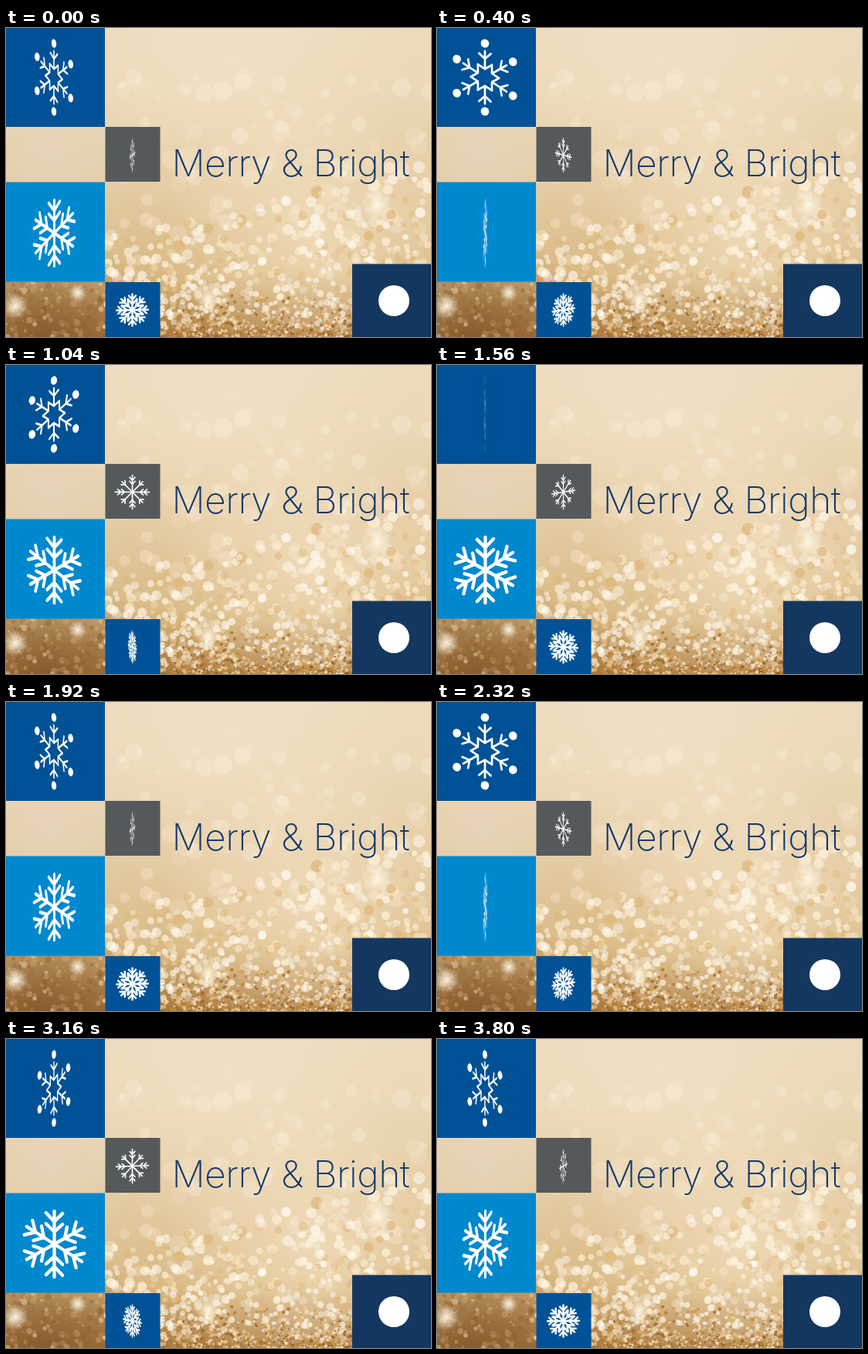
Animation of 550 by 400 pixels, one loop 3.84 s. Source, as an HTML page with a canvas:

```html
<!DOCTYPE html>
<html lang="en">
<head>
<meta charset="utf-8">
<title>Merry &amp; Bright</title>
<style>
  html, body { margin: 0; width: 550px; height: 400px; overflow: hidden; }
  canvas, svg { position: absolute; left: 0; top: 0; display: block; }
  text { font: 200 48px Inter, "Liberation Sans", sans-serif; letter-spacing: -0.5px; }
  .flake { fill: none; stroke: #fff; stroke-linecap: round; stroke-linejoin: round; }
</style>
</head>
<body>
<canvas id="glitter" width="550" height="400"></canvas>
<svg id="card" width="550" height="400" viewBox="0 0 550 400">
  <rect width="128" height="128" fill="#005195"/>
  <rect x="128.5" y="128" width="71" height="71" fill="#55595b"/>
  <rect y="199.5" width="128" height="129" fill="#0088ce"/>
  <rect x="128.5" y="329" width="71" height="71" fill="#005195"/>
  <rect x="448" y="305.5" width="102" height="95" fill="#14375f"/>
  <circle cx="502" cy="353" r="20" fill="#fff"/>
  <text x="214.5" y="192" fill="#14386a">Merry &amp; Bright</text>
</svg>
<script>
const LOOP = 3840, STEP = 40, TILT = 0.15;
const NS = "http://www.w3.org/2000/svg";
const card = document.getElementById("card");

function add(parent, tag, attrs) {
  const el = document.createElementNS(NS, tag);
  for (const name in attrs) el.setAttribute(name, attrs[name]);
  return parent.appendChild(el);
}

// Repeats one upright arm around the centre.
function addFlake({ x, y, peak, arms, arm, line, ball }) {
  const group = add(card, "g", { class: "flake", "stroke-width": line });
  for (let i = 0; i < arms; i++) {
    const spoke = add(group, "g", { transform: `rotate(${i * 360 / arms})` });
    add(spoke, "path", { d: arm(i) });
    if (ball) add(spoke, "circle", { cy: -44, r: ball, fill: "#fff", stroke: "none" });
  }
  return { group, x, y, peak };
}

const vee = (root, w, h) => `M${-w},${-root - h}L0,${-root}L${w},${-root - h}`;

const flakes = [
  { x: 62, y: 64, peak: 590, arms: 6, line: 2.8, ball: 5.6,
    arm: () => "M0,-11V-34" + vee(11, 9.5, 5.5) + vee(24, 8, 7) },
  { x: 62.5, y: 265.5, peak: 1395, arms: 6, line: 4.4,
    arm: () => "M0,0V-42.5" + vee(16, 11, 10) + vee(29, 11, 11) },
  { x: 163.5, y: 164.5, peak: 1060, arms: 8, line: 1.7,
    arm: i => i % 2 ? "M0,0V-19" + vee(13, 3.5, 4) : "M0,0V-22" + vee(10, 3.5, 4) + vee(15, 3.5, 4) },
  { x: 163.5, y: 365, peak: -85, arms: 8, line: 2.5,
    arm: () => "M0,0V-20.5" + vee(7, 5.5, 7) + vee(13.5, 4.5, 5) }
].map(addFlake);

function paintGlitter() {
  const ctx = document.getElementById("glitter").getContext("2d");
  let seed = 20;
  const rnd = (lo = 0, hi = 1) => {
    seed = (seed * 1664525 + 1013904223) % 4294967296;
    return lo + (hi - lo) * seed / 4294967296;
  };
  const dot = (x, y, r, color, alpha) => {
    ctx.globalAlpha = alpha;
    ctx.fillStyle = color;
    ctx.beginPath();
    ctx.arc(x, y, r, 0, 7);
    ctx.fill();
  };
  const glow = (x, y, r, color, alpha) => {
    const g = ctx.createRadialGradient(x, y, 0, x, y, r);
    g.addColorStop(0, color);
    g.addColorStop(1, color + "00");
    dot(x, y, r, g, alpha);
  };
  const pick = list => list[Math.floor(rnd(0, list.length))];

  const sky = ctx.createLinearGradient(0, 0, 0, 400);
  ["#ecdabb", "#ebd8b7", "#e6cfa8", "#e1c69a", "#d9b984", "#a8763a"]
    .forEach((c, i) => sky.addColorStop(i / 5, c));
  ctx.fillStyle = sky;
  ctx.fillRect(0, 0, 550, 400);
  glow(290, 40, 230, "#f4e5cb", 0.55);
  glow(60, 165, 110, "#e6d6c0", 0.7);
  glow(50, 410, 150, "#80552c", 0.85);
  glow(400, 280, 200, "#fdf0d8", 0.5);

  for (let i = 0; i < 90; i++)
    dot(rnd(128, 550), rnd(60, 270), rnd(4, 13), "#fff5e4", rnd(0.08, 0.3));

  // Specks grow denser and finer below a line rising to the right.
  const edge = x => 325 - 0.26 * x;
  for (let i = 0; i < 800; i++) {
    const x = rnd(128, 550), top = edge(x) - 40;
    const depth = Math.sqrt(rnd()), y = top + depth * (390 - top);
    const r = rnd(3, 7.5) * (1.2 - 0.65 * depth);
    dot(x, y, r, pick(["#fffdf8", "#fff8ea", "#fdf0d6", "#dfb678"]), rnd(0.25, 0.75));
  }
  for (let i = 0; i < 900; i++) {
    const x = rnd(190, 550), y = 402 - 60 * rnd() * rnd();
    dot(x, y, rnd(0.7, 2.5), pick(["#fff6e4", "#f0cd8c", "#c98c3c", "#8c5718", "#a66d28"]), rnd(0.4, 0.85));
  }
  for (let i = 0; i < 150; i++)
    dot(rnd(0, 128), rnd(329, 400), rnd(1, 4.5), pick(["#d9b078", "#f6e4c0", "#8a5c2c"]), rnd(0.12, 0.45));

  const flare = (x, y, r) => {
    glow(x, y, r, "#fff8e4", 0.9);
    ctx.strokeStyle = "#fffaf0";
    ctx.lineWidth = 0.6;
    ctx.globalAlpha = 0.4;
    ctx.beginPath();
    for (let a = 0.3; a < 3; a += Math.PI / 4) {
      const dx = r * Math.cos(a), dy = r * Math.sin(a);
      ctx.moveTo(x - dx, y - dy);
      ctx.lineTo(x + dx, y + dy);
    }
    ctx.stroke();
  };
  flare(12, 360, 17);
  flare(93, 343, 12);
  flare(262, 351, 18);
  flare(480, 229, 20);
}

// Each flake spins about its vertical axis, seen from slightly above.
function render(ms) {
  const t = Math.floor(ms % LOOP / STEP) * STEP;
  for (const { group, x, y, peak } of flakes) {
    const a = 2 * Math.PI * (t - peak) / LOOP;
    group.setAttribute("transform",
      `matrix(${Math.cos(a).toFixed(5)} ${(-TILT * Math.sin(a)).toFixed(5)} 0 1 ${x} ${y})`);
  }
}

paintGlitter();
render(0);
const start = performance.now();
requestAnimationFrame(function tick() {
  render(performance.now() - start);
  requestAnimationFrame(tick);
});
</script>
</body>
</html>
```
